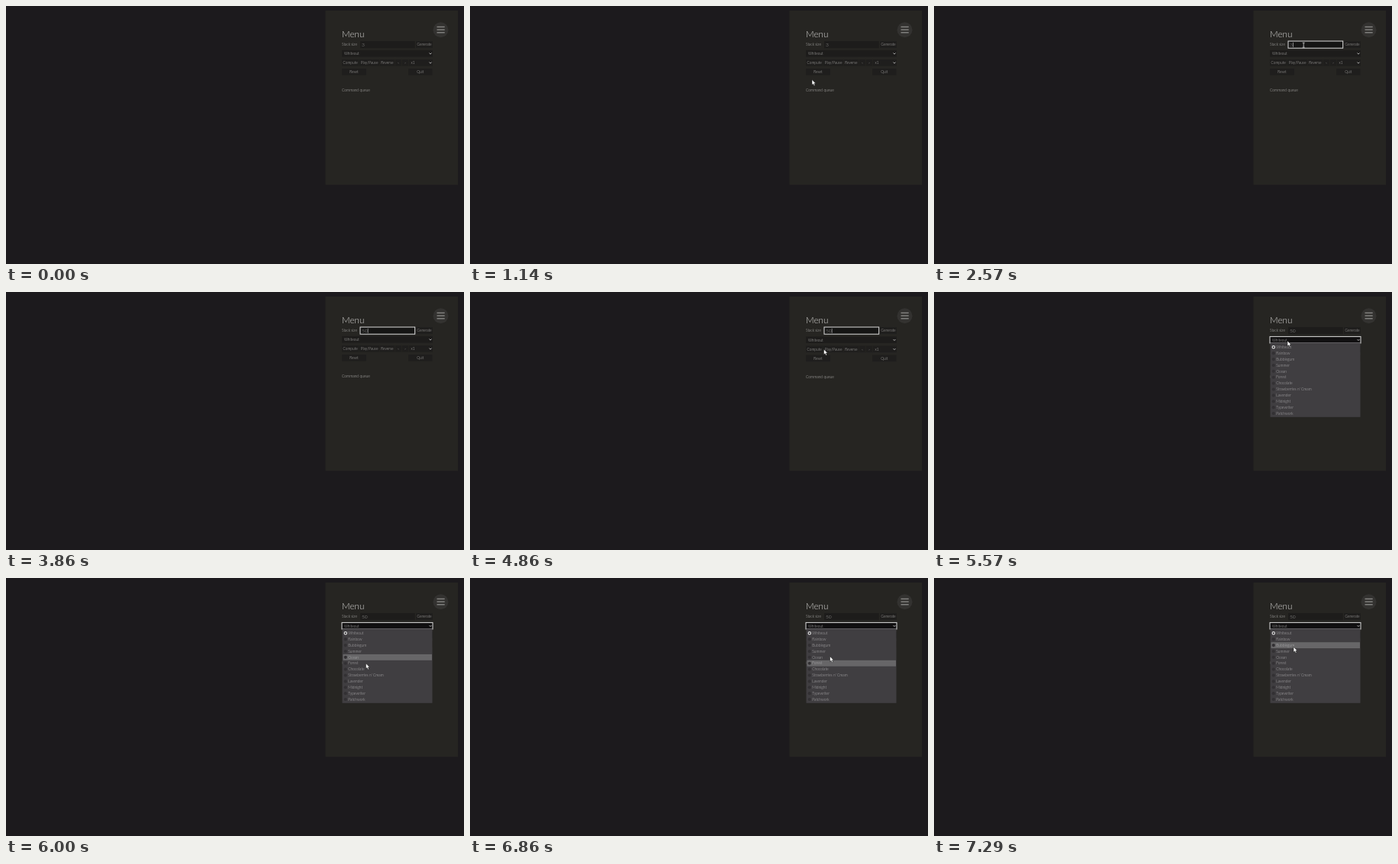
An HTML page that plays this animation: 600x338 px, repeating every 8 s.

```html
<!DOCTYPE html>
<html lang="en">
<head>
<meta charset="utf-8">
<title>Menu</title>
<style>
  html, body { margin: 0; width: 100%; height: 100%; overflow: hidden; background: #1c1a1d; }
  svg { display: block; width: 100vw; height: 100vh; }
  text { font-family: Lato, "Open Sans", sans-serif; font-weight: 300; }
</style>
</head>
<body>
<svg id="stage" viewBox="0 0 600 338"></svg>
<script>
const LOOP = 8000, RATE = 7 / 1000;  // the screen refreshes seven times a second
const LEFT = 440, RIGHT = 559;
const ROW = 7.88, LIST_TOP = 68.4;
const THEMES = ["Whiteout", "Rainbow", "Bubblegum", "Summer", "Ocean", "Forest", "Chocolate",
  "Strawberries n' Cream", "Lavender", "Midnight", "Typewriter", "Patchwork"];

// Moments, counted in refreshes
const FOCUS = 14, BEAM = 18, TYPE = 25, SHIFT = 28, RETURN = 34, PICK = 38, OPEN = 39;

const smooth = u => u * u * (3 - 2 * u);
const easeOut = u => u * (2 - u);

// Pointer strokes between refreshes
const MOVES = [
  { from: 2, to: 8, a: [61, 314], b: [448, 96.5], ease: smooth },
  { from: 8, to: 12, a: [448, 96.5], b: [482, 51], ease: easeOut },
  { from: RETURN, to: 37, a: [463.5, 75], b: [463, 64], ease: easeOut },
  { from: OPEN, to: 43, a: [463, 64], b: [472, 115], ease: easeOut },
  { from: 46, to: 50, a: [472, 115], b: [471, 90.2], ease: smooth }
];

function pointerAt(n) {
  const move = MOVES.filter(m => m.from <= n).pop();
  if (!move) return null;
  const u = move.ease(Math.min(1, (n - move.from) / (move.to - move.from)));
  return move.a.map((v, i) => v + (move.b[i] - v) * u);
}

const stage = document.getElementById("stage");

function set(node, attrs) {
  for (const key in attrs) node.setAttribute(key, attrs[key]);
}
function add(parent, tag, attrs, content) {
  const node = document.createElementNS("http://www.w3.org/2000/svg", tag);
  set(node, attrs);
  if (content) node.textContent = content;
  return parent.appendChild(node);
}
function show(node, on) {
  node.setAttribute("display", on ? "inline" : "none");
}
function box(parent, x, y, width, height, fill) {
  return add(parent, "rect", { x, y, width, height, fill });
}
function label(parent, x, y, content, size = 4.8, fill = "#bcbbb9", anchor = "start") {
  return add(parent, "text", { x, y, "font-size": size, fill, "text-anchor": anchor }, content);
}
function button(parent, x, y, width, content) {
  box(parent, x, y, width, 8.6, "#1f1e1d");
  label(parent, x + width / 2, y + 6, content, content.length > 1 ? 4.8 : 3.6, "#b6b5b3", "middle");
}
function chevron(parent, y) {
  add(parent, "path", { d: `M${RIGHT - 4.5} ${y - .8}l1.5 1.6l1.5 -1.6`, fill: "none", stroke: "#bbb", "stroke-width": .9 });
}
function outline(node, on, color, fill) {
  set(node, { fill: on ? fill : "#1d1c1b", stroke: on ? color : "none", "stroke-width": 1 });
}

// Panel
box(stage, 0, 0, 600, 338, "#1c1a1d");
box(stage, 418.5, 6, 173.5, 228.3, "#262522");
add(stage, "circle", { cx: 569.5, cy: 31.2, r: 10, fill: "#333230" });
for (let i = -1; i < 2; i++) box(stage, 564.5, 30.4 + 3.7 * i, 10.2, 1.4, "#868583");
label(stage, LEFT, 41.3, "Menu", 11.7, "#dcdbd9");
label(stage, LEFT, 52, "Stack size");

// Stack size field
const field = box(stage, 464, 46, 71.7, 9.2, "#1d1c1b");
const value = label(stage, 466, 52.7, "3", 6.6, "#a3a2a0");
const caret = box(stage, 470, 47.8, .6, 6, "#d0d0d0");
button(stage, 537, 46.2, 22, "Generate");

// Rows below the field
const lower = add(stage, "g", {});
const select = box(lower, LEFT, 57.9, RIGHT - LEFT, 8.6, "#1d1c1b");
label(lower, LEFT + 3, 64.2, "Whiteout");
chevron(lower, 62.3);
let x = LEFT;
for (const [name, width] of [["Compute", 22.4], ["Play/Pause", 26], ["Reverse", 19.3], ["<", 8.4], [">", 8.4]]) {
  button(lower, x, 70, width, name);
  x += width + .7;
}
box(lower, x, 70, RIGHT - x, 8.6, "#1f1e1d");
label(lower, x + 2.5, 76, "x1");
chevron(lower, 74.4);
button(lower, LEFT, 82, 32, "Reset");
button(lower, 527, 82, 31.5, "Quit");
label(lower, LEFT, 112.3, "Command queue", 5, "#c0bfbd");

// Theme list
const list = add(stage, "g", {});
box(list, LEFT + .5, 66.6, 118, 97.2, "#403e41");
const hover = box(list, LEFT + 1.5, 0, 116.5, ROW, "#676668");
THEMES.forEach((name, i) => {
  const y = LIST_TOP + ROW * (i + .5);
  add(list, "circle", i
    ? { cx: 444.8, cy: y, r: 2.1, fill: "#333134" }
    : { cx: 444.8, cy: y, r: 1.7, fill: "#2a282b", stroke: "#e2e2e2", "stroke-width": 1.1 });
  label(list, 448.3, y + 1.7, name, 4.9, "#b6b5b7");
});

// Pointers
const arrow = add(stage, "path", {
  d: "M0 0V7L1.6 5.6L2.8 8.1L4 7.5L2.9 5.1H5Z",
  fill: "#fff", stroke: "#111", "stroke-width": .5
});
const beam = add(stage, "path", {
  d: "M482.7 48.2h3m-1.5 0v6m-1.5 0h3",
  fill: "none", stroke: "#d8d8d8", "stroke-width": .8
});

function draw(t) {
  const n = Math.floor((t + 5) * RATE);
  const focused = n >= FOCUS && n < PICK;
  const typed = n < TYPE ? "3" : n < SHIFT - 1 ? "5" : "50";

  outline(field, focused, n > FOCUS ? "#dcdcdc" : "#a8a8a8", "#151514");
  value.textContent = typed;
  caret.setAttribute("x", 466.2 + 3.8 * typed.length);
  show(caret, focused);

  lower.setAttribute("transform", `translate(0 ${n < SHIFT ? 0 : .5})`);
  outline(select, n >= PICK, "#dcdcdc", "#111011");

  // The highlight trails the pointer by one refresh.
  const trail = pointerAt(n - 1);
  const row = trail ? Math.floor((trail[1] - LIST_TOP) / ROW) : -1;
  show(list, n >= OPEN);
  show(hover, row >= 0);
  hover.setAttribute("y", LIST_TOP + ROW * row);

  const tip = pointerAt(n);
  show(arrow, tip && (n < BEAM || n >= RETURN));
  if (tip) arrow.setAttribute("transform", `translate(${tip})`);
  show(beam, n >= BEAM && n < TYPE);
}

const start = performance.now();
function tick() {
  draw((performance.now() - start) % LOOP);
  requestAnimationFrame(tick);
}
tick();
</script>
</body>
</html>
```
